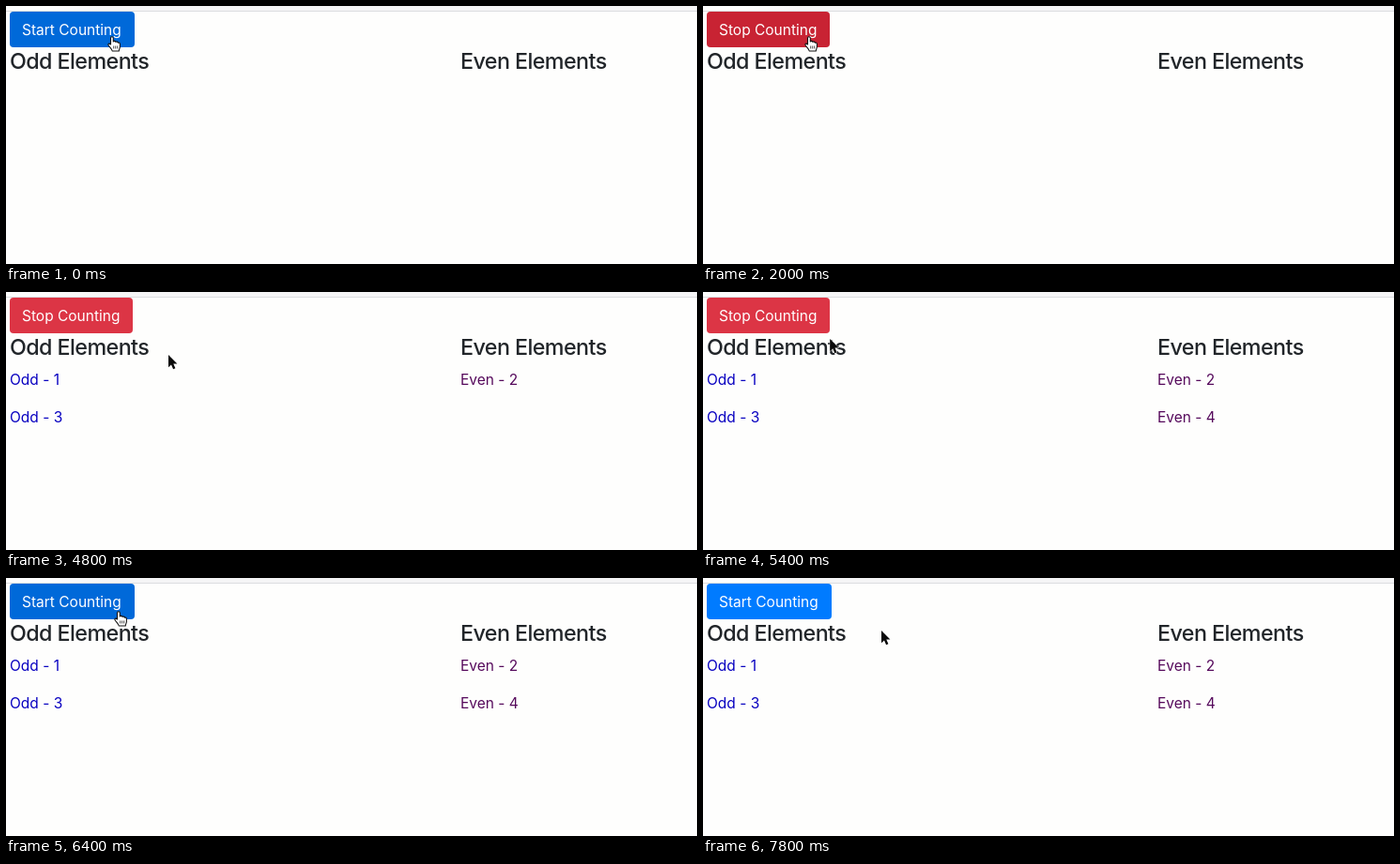
An HTML page for the animation above (8000 ms loop, 736 px wide and 275 px high).

```html
<!DOCTYPE html>
<html lang="en">
<head>
<meta charset="utf-8">
<style>
  html, body { margin: 0; width: 100%; height: 100%; overflow: hidden; background: #fefefd; }
  svg { display: block; }
  text { font: 15.5px Inter, Roboto, sans-serif; font-optical-sizing: none; }
  .head { font-size: 23.3px; font-weight: 500; letter-spacing: -.58px; fill: #212529; }
  .odd { fill: #0800c0; }
  .even { fill: #560a5c; }
</style>
</head>
<body>
<svg width="736" height="275" viewBox="0 0 736 275">
  <defs>
    <linearGradient id="bar">
      <stop offset=".06" stop-color="#fdfdfd"/>
      <stop offset=".14" stop-color="#f5f5f6"/>
    </linearGradient>
  </defs>
  <rect width="736" height="5" fill="url(#bar)"/>
  <rect y="5" width="736" height="1" fill="#dcdde0"/>
  <rect id="button" x="4" y="6" height="38" rx="4"/>
  <text id="label" x="17" y="31" fill="#fff"></text>
  <text class="head" x="4" y="67">Odd Elements</text>
  <text class="head" x="484" y="67">Even Elements</text>
  <g id="list"></g>
  <g id="hand">
    <path d="M3.5 9V2.2C3.5 .2 6.3 .2 6.3 2.2V6C7 5 8.7 5.3 8.9 6.4C9.8 5.7 11.1 6.1 11.3 7.2C12.3 6.7 13.4 7.3 13.4 8.5V11.5C13.4 13.3 12.3 14 12.3 16H5.2C5 14.2 2.8 12.3 1.2 10C.2 8.5 1.8 7.2 3.5 9Z"
      fill="#fff" stroke="#111" stroke-width="1.1" stroke-linejoin="round"/>
    <path d="M6.7 10.5V13.5M8.7 10.5V13.5M10.7 10.5V13.5" stroke="#222" stroke-width=".8"/>
  </g>
  <path id="arrow" d="M0 0V13.2L3 10.4L5.1 15.2L7.4 14.2L5.3 9.5H9.4Z"
    fill="#0a0a0a" stroke="#fff" stroke-width="1" paint-order="stroke"/>
</svg>
<script>
const LOOP = 8000, STEP = 200;
const $ = id => document.getElementById(id);

// [time, colour]
const colours = [
  [0, '#0069d9'], [1200, '#0062cc'], [1400, '#c82333'], [3200, '#d02a3a'], [3400, '#dc3545'],
  [5600, '#c82333'], [6000, '#c0212f'], [6200, '#0069d9'], [7000, '#007bff']
];
// [time, x, y] of each pointer's upper left corner
const handPath = [[0, 108, 32], [2800, 108, 32], [3000, 113, 34], [3200, 115, 35]];
const arrowPath = [
  [3200, 164, 63], [3800, 173, 67], [5000, 173, 67], [5600, 122, 44],
  [6800, 122, 44], [7400, 186, 58], [7800, 190, 56]
];
const starts = [2400, 3400, 4400, 5400];

const items = starts.map((start, i) => {
  const el = document.createElementNS('http://www.w3.org/2000/svg', 'text');
  const kind = i % 2 ? 'Even' : 'Odd';
  el.setAttribute('class', kind.toLowerCase());
  el.setAttribute('x', i % 2 ? 484 : 4);
  el.setAttribute('y', 99 + 40 * (i >> 1));
  el.textContent = `${kind} - ${i + 1}`;
  $('list').append(el);
  return el;
});

const show = (el, on) => el.setAttribute('visibility', on ? 'visible' : 'hidden');

function pointAt(path, t) {
  const i = path.findIndex(p => p[0] > t);
  if (i < 0) return path.at(-1).slice(1);
  if (i === 0) return path[0].slice(1);
  const [a, b] = [path[i - 1], path[i]];
  const u = (t - a[0]) / (b[0] - a[0]);
  const k = u * u * (3 - 2 * u);
  return [a[1] + (b[1] - a[1]) * k, a[2] + (b[2] - a[2]) * k];
}

function place(el, [x, y]) {
  el.setAttribute('transform', `translate(${x} ${y})`);
}

function draw(t) {
  const counting = t >= 1400 && t < 6200;
  $('button').setAttribute('width', counting ? 131 : 133);
  $('button').setAttribute('fill', colours.findLast(c => c[0] <= t)[1]);
  $('label').textContent = counting ? 'Stop Counting' : 'Start Counting';
  items.forEach((el, i) => show(el, t >= starts[i]));

  const returned = t >= 5600 && t < 7000;
  const hovering = t < 3200 || returned;
  show($('hand'), hovering);
  show($('arrow'), !hovering);
  place($('hand'), returned ? [115, 35] : pointAt(handPath, t));
  place($('arrow'), pointAt(arrowPath, t));
}

function tick() {
  draw(Math.floor(performance.now() % LOOP / STEP) * STEP);
  requestAnimationFrame(tick);
}
tick();
</script>
</body>
</html>
```
